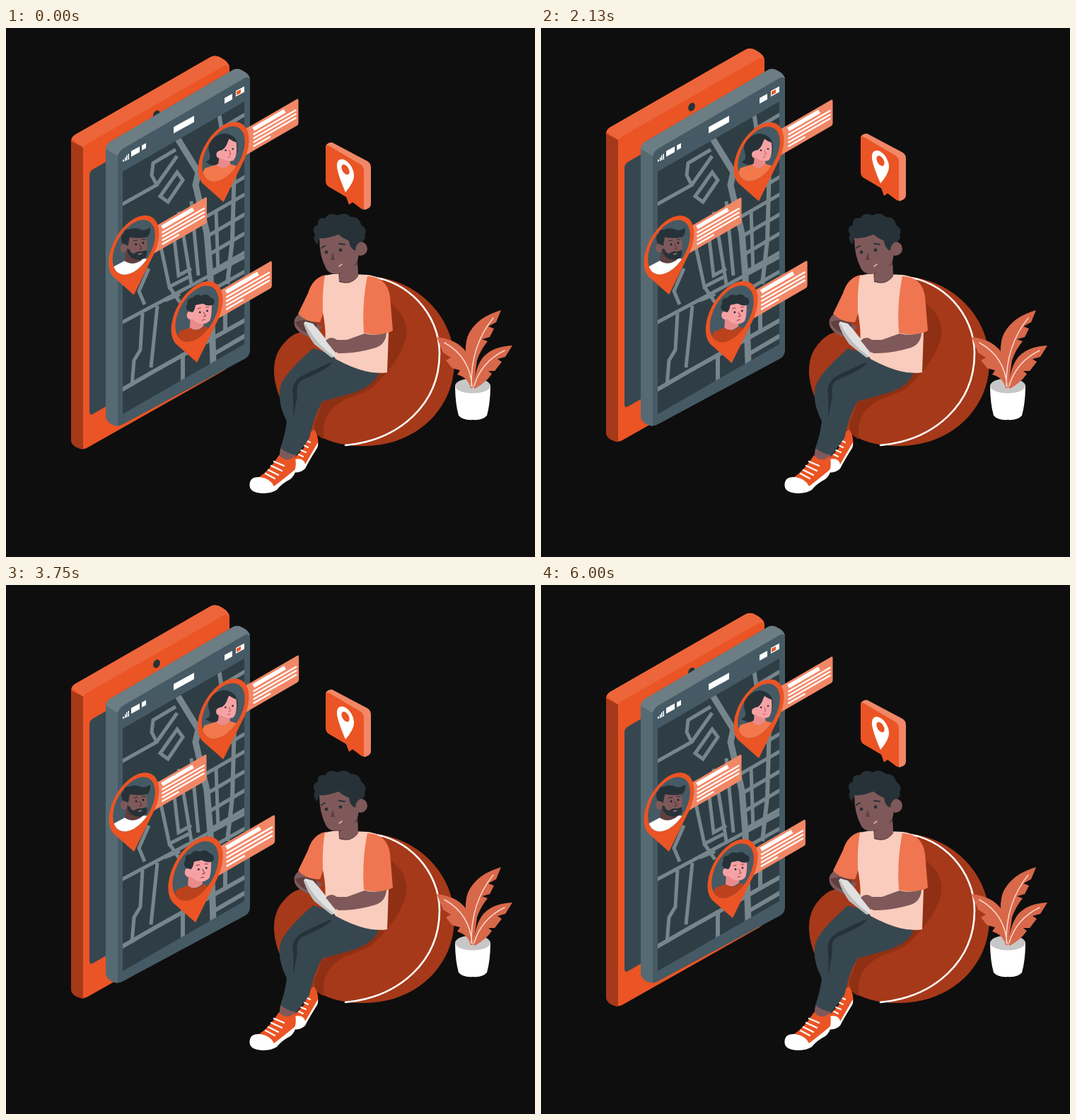
An HTML page that plays this animation: 748x748 px, repeating every 6040 ms.

```html
<!DOCTYPE html>
<html lang="en">
<head>
<meta charset="utf-8">
<title>Location sharing</title>
<style>
html, body { margin: 0; width: 100%; height: 100%; overflow: hidden; background: #0e0e0e; }
svg { display: block; width: 100vw; height: 100vh; }
.road { fill: none; stroke: #77868d; stroke-width: 5; }
.line { fill: none; stroke-linecap: round; stroke-linejoin: round; }
.skin { fill: #7f595a; }
.shade { fill: #603f40; }
</style>
</head>
<body>
<svg viewBox="0 0 748 748">
  <defs>
    <clipPath id="hole"><circle r="34.5" transform="matrix(.866 -.5 0 1 0 0)"/></clipPath>
    <clipPath id="map"><path d="M165 203L337 104V447L165 546Z"/></clipPath>
    <g id="flag">
      <path d="M25-28L101-72Q103-73 103-70V-39Q103-36 101-35L25 9Z" fill="#f18766"/>
      <g stroke="#fff">
        <path d="M40-30L84-55.500" stroke-width="5.500"/>
        <path d="M40-22.500L100-57M40-17L100-51.500M40-11.500L100-46M40-6L64-19.800" stroke-width="2.300"/>
      </g>
    </g>
    <g id="pin" transform="matrix(.866 -.5 0 1 0 0)">
      <path d="M0 67L-34 24A41 41 0 1 1 34 24Z" fill="#eb5424"/>
      <circle r="34.500" fill="#455a64"/>
    </g>
  </defs>

  <g id="panel">
    <path d="M92 160Q92 155 98 151L288 42Q296 37 305 43Q316 49 316 57V470Q316 479 309 484L118 592Q110 597 105 595Q92 591 92 582Z" fill="#eb5424"/>
    <path d="M92 160L109 169V596Q92 593 92 582Z" fill="#a63919"/>
    <path d="M93 157Q94 153 98 151L288 42Q296 37 305 43Q316 49 316 57Q313 51 306 55L118 162Q111 166 109 169Z" fill="#ed653a"/>
    <path d="M118 209Q118 203 123 200L300 98V444L123 546Q118 549 118 542Z" fill="#37474f"/>
    <path d="M187 150L238 120V140L187 170Z" fill="#263238"/>
    <ellipse cx="213" cy="122.500" rx="4.600" ry="6.200" transform="rotate(25 213 122.500)" fill="#263238"/>
  </g>

  <path d="M141 173Q141 165 147 161L318 61Q326 55 334 60Q345 65 345 74V455Q345 463 339 467L166 560Q157 565 150 560Q141 556 141 547Z" fill="#455a64"/>
  <path d="M141 171L158 181V563Q141 560 141 547Z" fill="#566a73"/>
  <path d="M141 171Q142 164 147 161L318 61Q326 55 334 60Q344 65 345 72Q342 68 337 71L168 169Q160 173 158 181Z" fill="#6c7d84"/>
  <path d="M165 203L337 104V447L165 546Z" fill="#2f3e45"/>
  <g clip-path="url(#map)" class="road">
    <path d="M240 152L272 204L268 222L284 290L289 350L293 475" stroke-width="9"/>
    <path d="M301 120L305 145L323 195L320 300L313 362" stroke-width="6"/>
    <path d="M340 121L308 140M310 227L340 209M272 273L340 234M282 296L340 262M286 321L340 289M288 346L340 316M292 370L340 343"/>
    <path d="M297 258L300 345"/>
    <path d="M163 250L213 222L206 208L208 191L240 172M218 238L242 204L250 215L229 246ZM213 222L242 181"/>
    <path d="M244 260L252 300L262 362M218 305L231 366L258 352M237 290L244 350L262 340M231 366L246 388M262 245L272 350"/>
    <path d="M202 340L188 372L196 391M163 417L247 372L340 322M214 393L205 480M193 403L190 455L181 470L178 506"/>
    <path d="M163 512L208 486L340 412M250 460V500M310 380V430M292 462L340 434M224 385L246 376" stroke-width="6"/>
  </g>
  <g id="status" fill="#fff">
    <path d="M165 186h2v3h-2zM168 183h1.500v5h-1.500zM170 180h1.500v7h-1.500zM172.500 178h1.500v8h-1.500z"/>
  </g>

  <g id="woman">
    <use href="#flag" x="1.500" y="-4.500"/>
    <use href="#pin"/>
    <g clip-path="url(#hole)">
      <path d="M-25 11Q-16 9-20-2Q-24-17-10-25Q2-33 14-24Q23-16 18 1L4 14L-8 16Q-17 17-25 11Z" fill="#263238"/>
      <path d="M-6 1L9 8L10 22Q-4 28-13 18L-7 13Z" fill="#e98b8b"/>
      <path d="M-36 40L-26 20L-10 15Q0 25 9 14L22 18L34 40Z" fill="#f3784b"/>
      <path d="M-6-10Q4-10 8-21Q14-17 18-16Q20 2 14 9Q5 12-5 5Z" fill="#f6a2a5"/>
      <ellipse cx="-6" cy="1" rx="4" ry="5" fill="#f6a2a5"/>
      <path d="M-8-5Q-4-21 8-26L5-14Q2-7-3-5Z" fill="#263238"/>
      <g fill="#263238"><circle cx="3" cy="-5" r="1.300"/><circle cx="13" cy="-7" r="1.300"/></g>
      <path d="M8-5L10 0L8 1M6 5L9 4" class="line" stroke="#c94f55"/>
    </g>
  </g>

  <g id="bearded">
    <use href="#flag" x="-.5" y="2"/>
    <use href="#pin"/>
    <g clip-path="url(#hole)">
      <path d="M-36 45L-28 27L-13 19Q0 24 11 15L20 17L24 40Z" fill="#fff"/>
      <path d="M-11 3L11 12V18Q-2 27-13 19Z" class="shade"/>
      <path d="M-12-14L16-18Q20-6 18 8L10 15L-6 13Z" class="skin"/>
      <ellipse cx="-14" cy="1" rx="5" ry="6.500" class="skin"/>
      <path d="M-16-5Q-21-15-14-20Q-15-25-7-25Q2-29 12-24Q18-24 23-28Q24-18 18-14Q8-12-6-14L-8-2L-12-4Z" fill="#263238"/>
      <path d="M-10 2L-6 3Q-5 8 0 9Q5 5 11 6L18 4Q20 13 14 16Q6 20-3 15Q-9 11-10 2Z" fill="#263238"/>
      <g fill="#201d1d"><circle cx="3" cy="-4" r="1.400"/><circle cx="13" cy="-6" r="1.400"/></g>
      <path d="M0-9L5-10M11-11L16-11" class="line" stroke="#263238" stroke-width="1.200"/>
      <path d="M8-4L11 2L8 3" class="line" stroke="#4b2d2d"/>
      <path d="M6 10L11 9" stroke="#b0787a" stroke-width="1.500"/>
    </g>
  </g>

  <g id="boy">
    <use href="#flag"/>
    <use href="#pin"/>
    <g clip-path="url(#hole)">
      <path d="M-35 46L-24 24L-10 19Q0 27 11 17L25 27L23 46Z" fill="#bb421c"/>
      <path d="M-9 2L9 11V17Q-1 26-10 19Z" fill="#e98b8b"/>
      <path d="M-8-12L20-16Q21 0 18 9Q11 17 0 12L-8 6Z" fill="#f6a2a5"/>
      <ellipse cx="-9" cy="2" rx="5" ry="6" fill="#f6a2a5"/>
      <path d="M-10-3Q-18-7-13-14Q-15-21-6-22Q-2-28 6-25Q14-29 18-23Q26-21 23-13Q16-9 8-14L-2-12Q-3-5-6-2Z" fill="#263238"/>
      <g fill="#263238"><circle cx="4" cy="-2" r="1.400"/><circle cx="14" cy="-4" r="1.400"/></g>
      <path d="M1-7L5-8M12-9L16-9M9-2L12 3L9 4M7 9L11 8" class="line" stroke="#963f42"/>
    </g>
  </g>

  <g id="bubble">
    <path d="M452 169Q452 165 457 163L461 162.500L511 189Q516 192 516 198V249Q516 254 512 256L507 258L491 246L485 250L481 239Z" fill="#f18766"/>
    <path d="M452 169Q452 166 456 167L502 194Q506 197 506 203V255Q506 259 502 256L490 247L485 250.500L481.500 240L456 225Q452 222 452 217Z" fill="#eb5424"/>
    <g transform="matrix(.866 .5 0 1 480 203)">
      <path d="M0 30Q-14 9-14-1A14 14 0 1 1 14-1Q14 9 0 30Z" fill="#fff"/>
      <circle r="6.500" cy="-2" fill="#eb5424"/>
    </g>
  </g>

  <!-- bean bag -->
  <path d="M379 488Q378 463 392 447Q402 434 416 430L470 366L507 351C577 351 634 405 634 472C634 539 579 591 507 591Q462 592 432 570Q382 540 379 488Z" fill="#a63919"/>
  <path d="M545 390Q576 415 562 449Q550 479 516 510L490 524Q456 532 449 581Q435 575 436 560L447 530L525 489Z" fill="#8f3014"/>
  <path d="M450 580Q443 546 478 526Q536 505 548 490Q567 484 584 492Q540 502 512 518Q460 529 450 580Z" fill="#a63919"/>
  <path d="M514 352C568 356 613 405 613 460C613 532 556 583 480 590" class="line" stroke="#fff" stroke-width="2.600"/>

  <!-- shoes -->
  <path d="M436 568Q443 579 441 590Q430 608 423 622Q416 629 407 628L404 612L421 594L430 571Z" fill="#eb5424"/>
  <path d="M441 586Q442 592 438 597Q428 613 423 623Q416 630 406 628L408 610Q421 607 423 617Z" fill="#fff"/>
  <path d="M424 583L430 586M421 590L427 593M417 597L424 600M414 603L420 606" class="line" stroke="#fff" stroke-width="2"/>
  <path d="M388 594L412 600L407 613L386 609Z" class="skin"/>
  <path d="M386 604Q397 616 408 605Q411 614 409 623Q406 636 391 644Q382 656 367 657L345 648Q345 637 358 635Q373 625 386 604Z" fill="#eb5424"/>
  <path d="M345 642Q347 634 359 635Q374 637 379 648Q396 635 409 624Q410 631 402 638Q390 644 383 653Q372 660 355 657Q342 654 345 642Z" fill="#fff"/>
  <path d="M379 613L393 619M375 619L390 626M371 625L385 632M367 630L380 637" class="line" stroke="#fff" stroke-width="2.400"/>

  <!-- trousers -->
  <path d="M434 453L464 462L527 488Q518 510 480 519L448 528Q437 543 429 580L411 604Q398 602 388 594Q395 574 397 556Q383 529 388 507Q393 489 434 453Z" fill="#37474f"/>
  <path d="M461 473Q455 483 420 497Q409 502 412 520L406 552Q407 525 405 512Q407 497 422 490L456 474Z" fill="#263238"/>

  <!-- arms, shirt -->
  <path d="M416 403Q404 411 409 423Q415 434 433 438L447 423Z" class="skin"/>
  <path d="M409 416Q422 409 440 418L437 432Q419 434 409 416Z" class="shade"/>
  <path d="M453 349Q434 352 427 375L413 404Q425 417 444 416L455 385Z" fill="#ef7650"/>
  <path d="M451 350Q470 345 489 349Q513 347 526 353Q541 386 541 430L539 487Q510 492 466 468L451 444Q453 428 448 402Q447 370 451 350Z" fill="#f9ccbd"/>
  <path d="M511 351Q539 352 543 380L547 428Q531 437 506 431Q503 390 511 351Z" fill="#ef7650"/>
  <path d="M507 432Q523 436 538 431Q537 447 523 452Q497 460 470 460Q456 452 453 441Q460 435 468 441L482 441Z" class="skin"/>
  <path d="M423 415L434 418Q452 437 467 463L461 466L436 447Q425 432 421 418Z" fill="#e0e0e0"/>
  <path d="M421 418L424 419Q437 445 462 463L460 466L436 447Q426 433 421 418Z" fill="#bdbdbd"/>
  <path d="M452 442Q463 436 469 445L479 451L466 459Z" class="skin"/>

  <!-- head -->
  <path d="M470 342L497 327L498 351Q488 365 471 359Z" class="shade"/>
  <path d="M472 348L497 334L498 351Q486 364 471 357Z" class="skin"/>
  <path d="M443 296Q443 323 453 341Q460 351 475 346Q492 342 498 326L500 292L470 288Z" class="skin"/>
  <circle cx="501" cy="312" r="10" class="skin"/>
  <path d="M440 306Q433 299 437 292Q431 282 441 278Q440 267 451 269Q458 259 468 265Q480 259 487 267Q500 267 502 278Q512 285 507 293Q510 301 500 303Q494 307 494 315Q486 312 485 301Q477 298 470 292Q452 299 443 297Z" fill="#263238"/>
  <g fill="#263238"><circle cx="453" cy="317" r="2.400"/><circle cx="473" cy="314" r="2.400"/></g>
  <path d="M446 311L451 308M471 305L479 306" class="line" stroke="#263238" stroke-width="2"/>
  <path d="M462 317L459 328L465 328Z" class="shade"/>
  <path d="M471 337L475 334" class="line" stroke="#e9a69a" stroke-width="1.600"/>

  <!-- plant -->
  <path d="M635 505Q635 530 640 548Q646 555 660 554Q674 555 680 548Q685 530 685 505Z" fill="#fff"/>
  <ellipse cx="660" cy="506" rx="25" ry="10.500" fill="#c7c7c7"/>
  <g fill="#d8684a">
    <path d="M656 505Q644 451 655 431Q668 408 700 399L693 416L682 422L690 425L684 437L673 440L681 443Q671 455 666 470L661 506Z"/>
    <path d="M661 508Q663 480 675 465Q689 450 716 449L706 465L695 468L701 472L691 485L682 485L687 489Q679 501 663 510Z"/>
    <path d="M657 509Q653 494 638 490L642 484L631 481L622 470L629 466L618 459L609 437Q643 441 654 464Q664 484 660 509Z"/>
  </g>
  <path d="M658 506Q657 449 689 410M662 506Q672 472 705 456M659 507Q656 465 620 445" class="line" stroke="#fbd2c4" stroke-width="1.600"/>
</svg>
<script>
const LOOP = 6040, CYCLE = 6000, LEAD = 40;
const byId = id => document.getElementById(id);

// Upright parallelograms lying on the phone's face: x, y, width, height, colour
const blocks = [
  [237, 140, 29, 9, '#fff'], [177, 174, 12, 8, '#fff'], [192, 166, 6, 7, '#fff'],
  [309, 99, 11, 8, '#fff'], [325, 89, 12, 8, '#fff'], [326, 90, 6, 5, '#eb5424']
];
byId('status').insertAdjacentHTML('beforeend', blocks.map(([x, y, w, h, fill]) =>
  `<path d="M${x} ${y}l${w} ${-w * 0.55}v${h}l${-w} ${w * 0.55}z" fill="${fill}"/>`).join(''));

const markers = [
  { el: byId('woman'), x: 308, y: 178, period: 3000 },
  { el: byId('bearded'), x: 181, y: 310, period: 6000 },
  { el: byId('boy'), x: 271, y: 404, period: 1500 }
];

const phase = (t, period) => (t % period) / period;
const lift = (t, period) => -15 * (1 - Math.abs(1 - 2 * phase(t, period)));

// Two beats per period, linear between the stops
const beatStops = [[0, 1], [0.1, 1.1], [0.3, 1], [0.4, 1], [0.5, 1.1], [0.6, 1], [1, 1]];
function beat(p) {
  const i = beatStops.findIndex(([at]) => at > p);
  const [p0, s0] = beatStops[i - 1], [p1, s1] = beatStops[i];
  return s0 + (s1 - s0) * (p - p0) / (p1 - p0);
}

function draw(ms) {
  const t = LEAD + Math.min(ms, CYCLE) * (CYCLE - LEAD) / CYCLE;
  byId('panel').setAttribute('transform', `translate(0 ${lift(t, 6000)})`);
  byId('bubble').setAttribute('transform', `translate(0 ${lift(t, 1500)})`);
  for (const { el, x, y, period } of markers) {
    const scale = beat(phase(t, period));
    el.setAttribute('transform',
      `translate(${x + 33.5} ${y - 3}) scale(${scale}) translate(-33.5 3)`);
  }
}

const start = performance.now();
function tick() {
  draw((performance.now() - start) % LOOP);
  requestAnimationFrame(tick);
}
tick();
</script>
</body>
</html>
```
